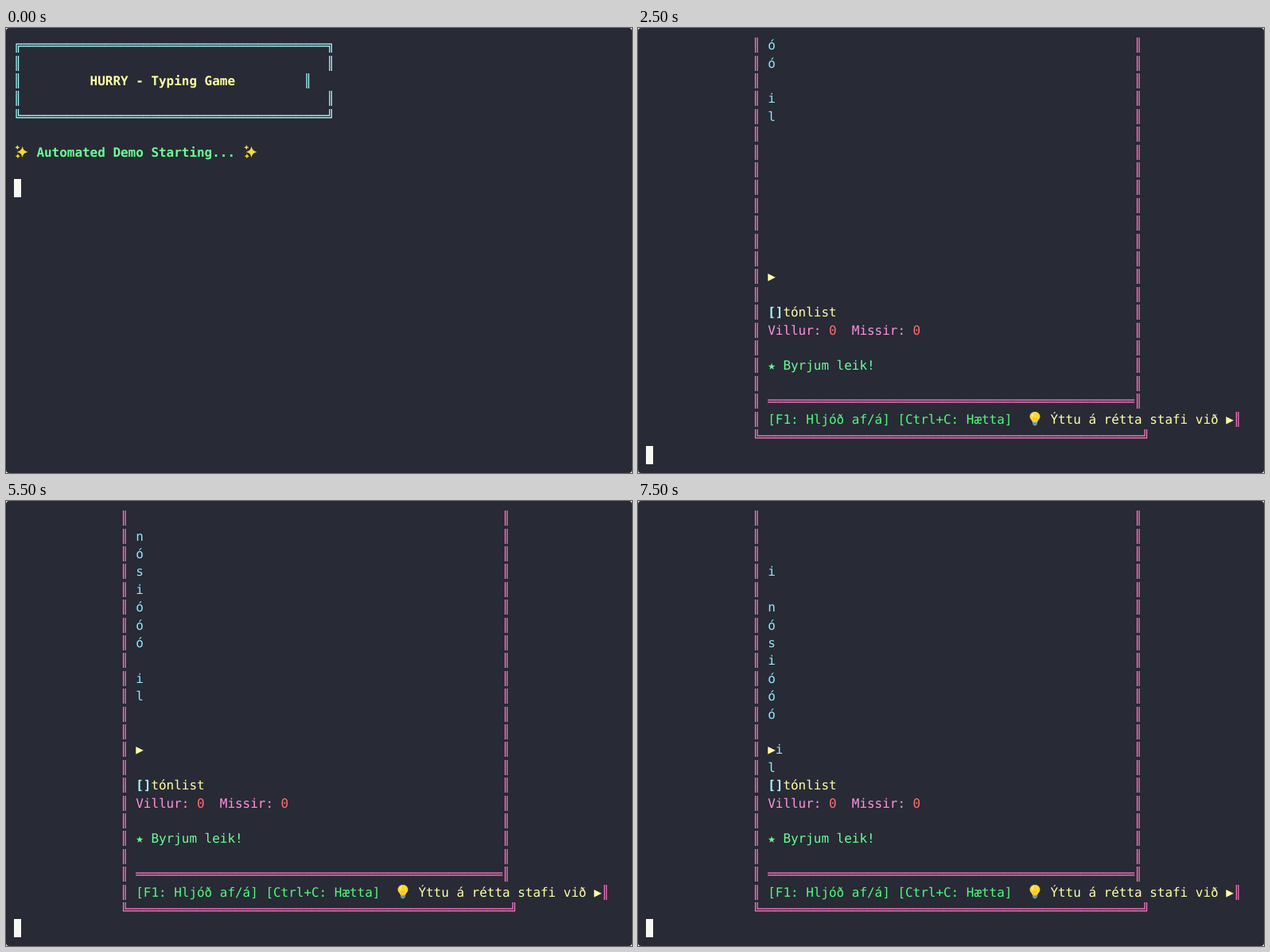
Recreate the animation shown at these times as an HTML page. Size 787 px wide and 560 px high, loop 8000 ms.

```html
<!DOCTYPE html>
<html lang="is">
<head>
<meta charset="utf-8">
<title>Typing Game</title>
<style>
  html, body { margin: 0; width: 100%; height: 100%; overflow: hidden; background: #fff; }
  svg { display: block; }
  text {
    font: 16px "DejaVu Sans Mono", monospace;
    text-rendering: geometricPrecision;
    white-space: pre;
  }
  .bold { font-weight: bold; }
</style>
</head>
<body>
<svg id="stage" width="787" height="560" viewBox="0 0 787 560">
  <defs>
    <path id="star" d="M0-1C.14-.36 .36-.14 1 0C.36 .14 .14 .36 0 1C-.14 .36-.36 .14-1 0C-.36-.14-.14-.36 0-1Z"/>
    <g id="sparkles" fill="#fdd835">
      <use href="#star" transform="translate(75 66) scale(48)"/>
      <use href="#star" transform="translate(32 27) scale(22)"/>
      <use href="#star" transform="translate(36 103) scale(22)"/>
    </g>
    <g id="bulb">
      <path fill="#fdd835" d="M64 5C38 5 20 23 20 46C20 68 40 76 44 96H84C88 76 108 68 108 46C108 23 90 5 64 5Z"/>
      <path fill="#fff59d" d="M36 44C37 28 45 19 58 16C50 24 45 33 44 47Z"/>
      <path fill="none" stroke="#f9a825" stroke-width="5" d="M56 94L49 60L64 67L79 60L72 94"/>
      <path fill="#82aec0" d="M44 94H84V111Q82 117 75 118Q72 124 64 124Q56 124 53 118Q46 117 44 111Z"/>
      <path stroke="#2f7889" stroke-width="4" d="M44 103H84M46 112H82"/>
    </g>
  </defs>
  <rect width="787" height="560" rx="4" fill="#282a36"/>
  <g id="intro"></g>
  <g id="game"></g>
  <g id="letters"></g>
  <rect id="cursor" width="9.6" height="22.4" fill="#f8f8f2" shape-rendering="crispEdges"/>
</svg>
<script>
const NS = "http://www.w3.org/2000/svg";
const CELL = 9.6, LINE = 22.4, STEP = 500, LOOP = 8000;
const SPAWNS = "li óóóisón i";
const MARKER_ROW = 13;
const COLOR = {
  red: "#ff6e6e", green: "#50fa7b", lime: "#69ff94", yellow: "#ffffa5",
  pink: "#ff79c6", rose: "#ff92df", cyan: "#8be9fd", ice: "#a4ffff"
};

const byId = id => document.getElementById(id);
const [intro, game, letters, cursor] = ["intro", "game", "letters", "cursor"].map(byId);
const colX = col => CELL * (col + 1);
const rowY = row => LINE * (row + 0.5);

function add(parent, tag, attrs) {
  const node = document.createElementNS(NS, tag);
  for (const key in attrs) node.setAttribute(key, attrs[key]);
  return parent.appendChild(node);
}

// Terminal text: each character sits in its own grid cell.
function print(parent, row, col, string, color, bold) {
  const node = add(parent, "text", {
    x: [...string].map((_, i) => colX(col + i).toFixed(2)).join(" "),
    y: (rowY(row) + 16).toFixed(2),
    fill: COLOR[color]
  });
  if (bold) node.setAttribute("class", "bold");
  node.textContent = string;
  return node;
}

function emoji(parent, row, col, id) {
  add(parent, "use", {
    href: "#" + id,
    transform: `translate(${colX(col)} ${rowY(row) + 0.6}) scale(0.147)`
  });
}

function buildIntro() {
  const put = (row, col, string, color) => print(intro, row, col, string, color, true);
  const bar = "═".repeat(40);
  put(0, 0, `╔${bar}╗`, "ice");
  for (const row of [1, 2, 3]) {
    put(row, 0, "║", "ice");
    put(row, row === 2 ? 38 : 41, "║", "ice");
  }
  put(2, 10, "HURRY - Typing Game", "yellow");
  put(4, 0, `╚${bar}╝`, "ice");
  emoji(intro, 6, 0, "sparkles");
  put(6, 3, "Automated Demo Starting...", "lime");
  emoji(intro, 6, 30, "sparkles");
}

function buildGame() {
  const put = (...args) => print(game, ...args);
  for (let row = 0; row < 22; row++) {
    put(row, 14, "║", "pink");
    put(row, row === 21 ? 77 : 64, "║", "pink");
  }
  put(MARKER_ROW, 16, "▶", "yellow", true);
  put(15, 16, "[]", "ice", true);
  put(15, 18, "tónlist", "yellow");
  put(16, 16, "Villur:", "rose");
  put(16, 24, "0", "red");
  put(16, 27, "Missir:", "rose");
  put(16, 35, "0", "red");
  put(18, 16, "★ Byrjum leik!", "lime");
  put(20, 16, "═".repeat(48), "pink");
  put(21, 16, "[F1: Hljóð af/á] [Ctrl+C: Hætta]", "green");
  emoji(game, 21, 50, "bulb");
  put(21, 53, "Ýttu á rétta stafi við ▶", "yellow");
  put(22, 14, `╚${"═".repeat(50)}╝`, "pink");
}

let shownStep = -1;

function render(time) {
  const step = Math.floor((time % LOOP) / STEP);
  if (step === shownStep) return;
  shownStep = step;

  const playing = step > 0;
  intro.style.display = playing ? "none" : "";
  game.style.display = playing ? "" : "none";
  cursor.setAttribute("x", colX(0));
  cursor.setAttribute("y", rowY(playing ? 23 : 8));

  letters.replaceChildren();
  [...SPAWNS].forEach((letter, i) => {
    const row = step - 1 - i;
    if (row < 0 || letter === " ") return;
    print(letters, row, row === MARKER_ROW ? 17 : 16, letter, "cyan");
  });
}

buildIntro();
buildGame();
const start = performance.now();
function tick() {
  render(performance.now() - start);
  requestAnimationFrame(tick);
}
tick();
</script>
</body>
</html>
```
